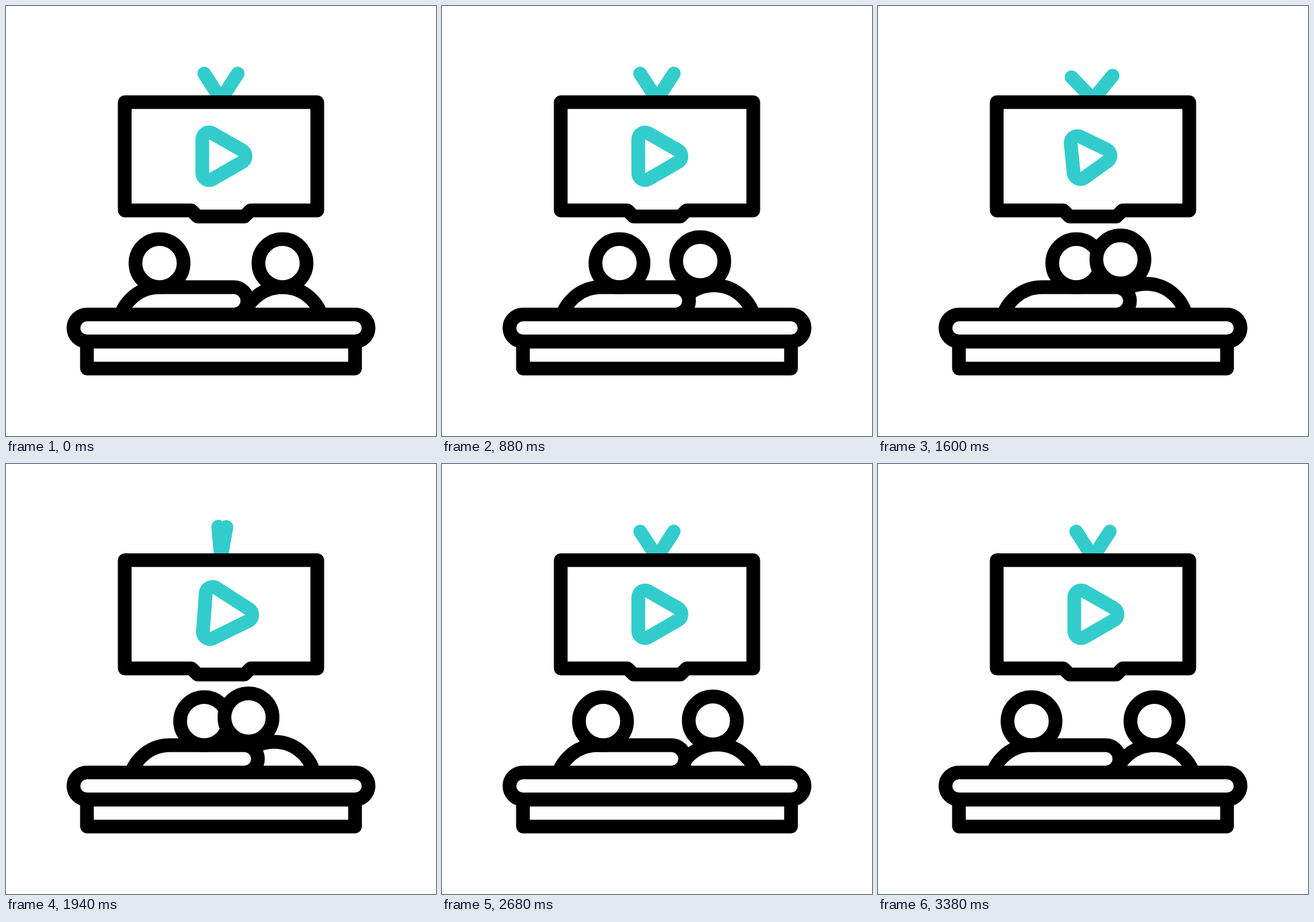
Recreate the animation shown at these times as an HTML page. Size 640 by 640 pixels, loop 3.6 s.

```html
<!DOCTYPE html>
<html lang="en">
<head>
<meta charset="utf-8">
<title>Watching TV together</title>
<style>
  html, body { margin: 0; width: 100%; height: 100%; overflow: hidden; background: #fff; }
  svg { display: block; width: 100vw; height: 100vh; }
  .ink { fill: #fff; stroke: #000; stroke-width: 20.4; stroke-linejoin: round; }
  .teal { fill: none; stroke: #3cc; stroke-width: 20.4; stroke-linecap: round; stroke-linejoin: round; }
  .teal.wide { stroke-width: 41; }
</style>
</head>
<body>
<svg viewBox="0 0 640 640">
  <path id="antennaL" class="teal" d="M320 139V93.1"/>
  <path id="antennaR" class="teal" d="M320 139V93.1"/>
  <path class="ink" d="M176.7 143.1H463.3V304.3H364L355 313.2H285L276 304.3H176.7Z"/>
  <polygon id="playRim" class="teal wide"/>
  <polygon id="playHole" fill="#fff"/>

  <path id="bodyR" class="ink" d="M350.5 479.5a61 61 0 0 1 122 0"/>
  <path id="bodyL" class="ink" d="M167.5 479.5a61 61 0 0 1 61 -61H339a20.3 20.3 0 0 1 0 40.6H172"/>
  <circle id="headL" class="ink" cx="228.5" cy="382.7" r="35.8"/>
  <circle id="headR" class="ink" cx="411.5" cy="382.7" r="35.8"/>

  <rect class="ink" x="120.5" y="499.4" width="399" height="40.2"/>
  <rect class="ink" x="100.4" y="459.1" width="439.2" height="40.2" rx="20.1"/>
</svg>
<script>
const LOOP = 3600;
const $ = id => document.getElementById(id);

// Cubic bezier (.71, 0, .12, 1): slow start, long settling tail.
function ease(x) {
  let lo = 0, hi = 1;
  for (let i = 0; i < 24; i++) {
    const s = (lo + hi) / 2, r = 1 - s;
    const at = 3 * 0.71 * s * r * r + 3 * 0.12 * s * s * r + s * s * s;
    if (at < x) lo = s; else hi = s;
  }
  return lo * lo * (3 - 2 * lo);
}

// Value at time t along [time, value] keys, eased between neighbours.
function track(keys, t) {
  if (t <= keys[0][0]) return keys[0][1];
  for (let i = 1; i < keys.length; i++) {
    const [t0, a] = keys[i - 1], [t1, b] = keys[i];
    if (t < t1) return a + (b - a) * ease((t - t0) / (t1 - t0));
  }
  return keys[keys.length - 1][1];
}

const cuddle = [[170, 0], [1775, 1], [3380, 0]];
const shrink = [[770, 0], [1660, 1], [2020, -1], [2390, 0]];
const sway = (rest, open, shut) =>
  [[850, rest], [1110, open], [1370, shut], [1630, open], [1890, shut], [2390, rest]];
const swayL = sway(-33, -44.3, -5);
const swayR = sway(33, 39.8, 10);

// Part id and its full shift when the pair leans together.
const lean = [
  ["headL", 67, 0],
  ["bodyL", 15.8, 0],
  ["headR", -51, -5.6],
  ["bodyR", -12.5, -5]
];

// Play triangle corners: x, y, and shift at full shrink.
const corners = [
  [302.4, 198.4, -5.4, 5.5],
  [302.4, 248.8, -1, -1.5],
  [346.2, 223.6, -10.5, -1]
];

function draw(t) {
  const near = track(cuddle, t);
  for (const [id, dx, dy] of lean)
    $(id).setAttribute("transform", `translate(${dx * near} ${dy * near})`);

  $("antennaL").setAttribute("transform", `rotate(${track(swayL, t)} 320 139)`);
  $("antennaR").setAttribute("transform", `rotate(${track(swayR, t)} 320 139)`);

  const k = track(shrink, t);
  const points = corners.map(([x, y, dx, dy]) => `${x + dx * k},${y + dy * k}`).join(" ");
  $("playRim").setAttribute("points", points);
  $("playHole").setAttribute("points", points);
}

const start = performance.now();
function tick() {
  draw((performance.now() - start) % LOOP);
  requestAnimationFrame(tick);
}
tick();
</script>
</body>
</html>
```
